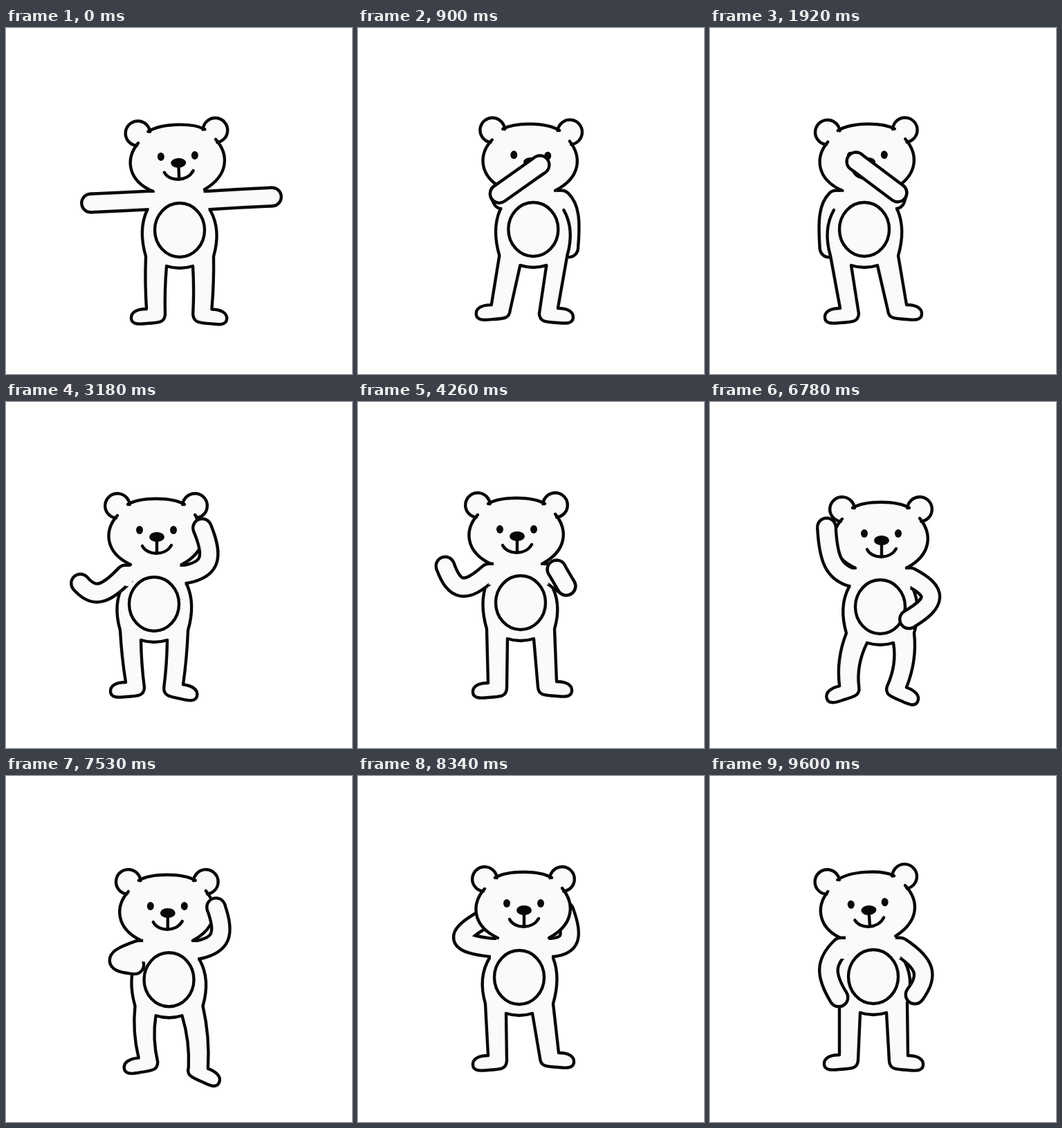
Recreate the animation shown at these times as an HTML page with a canvas. Size 500 by 500 pixels, loop 9630 ms.

```html
<!DOCTYPE html>
<html lang="en">
<head>
<meta charset="utf-8">
<title>Dancing bear</title>
<style>
  html, body { margin: 0; width: 100%; height: 100%; overflow: hidden; background: #fff; }
  canvas { display: block; width: 100vw; height: 100vh; object-fit: contain; }
</style>
</head>
<body>
<canvas id="stage" width="500" height="500"></canvas>
<script>
const ctx = document.getElementById('stage').getContext('2d');
const LOOP = 9630, STEP = 30, AXIS = 477;
const FUR = '#fafafa', INK = '#080808', LINE = 4.4, ARM = 26.5;

// Elbow x, y and hand x, y measured outward from the shoulder, then folded and behind flags.
const ARMS = {
  sideL: [40, 2, 84, 4, 0, 0],
  sideR: [46, -3, 92, -5, 0, 0],
  back: [14, 14, 10, 70, 0, 1],
  cover: [3, -10, -57, -55, 1, 0],
  wave: [40, 42, 65, 13, 0, 0],
  up: [49, -9, 25, -67, 0, 0],
  curl: [26, 19, 12, -5, 1, 0],
  lift: [45, 40, 63, -10, 0, 0],
  raise: [32, -10, 35, -72, 0, 0],
  hip: [53, 28, -2, 61, 0, 0],
  napeL: [70, -8, 10, -42, 0, 1],
  napeR: [38, -3, 19, -53, 0, 1],
  hangL: [30, 29, 3, 73, 0, 0],
  hangR: [49, 32, 21, 69, 0, 0]
};

// head: x, y, tilt; belly: x, y; feet: left toe x, y, right toe x, y
const pose = (head, belly, left, right, feet) =>
  ({ head, belly, left: ARMS[left], right: ARMS[right], feet });

const mirror = ({ head, belly, left, right, feet }) => ({
  head: [AXIS - head[0], head[1], -head[2]],
  belly: [AXIS - belly[0], belly[1]],
  left: right,
  right: left,
  feet: [AXIS - feet[2], feet[3], AXIS - feet[0], feet[1]]
});

const open = pose([248, 189, -.04], [251, 292], 'sideL', 'sideR', [181, 420, 319, 421]);
const shy = pose([227, 188, -.03], [223, 291], 'back', 'cover', [166, 419, 306, 414]);
const hello = pose([217, 189, 0], [214, 292], 'wave', 'up', [151, 419, 276, 425]);
const groove = pose([248, 188, 0], [242, 290], 'curl', 'lift', [168, 418, 311, 420]);
const salute = pose([247, 194, 0], [246, 296], 'raise', 'hip', [169, 429, 300, 433]);
const relax = pose([239, 188, 0], [233, 291], 'napeL', 'napeR', [166, 418, 312, 414]);
const rest = pose([228, 188, -.07], [236, 290], 'hangL', 'hangR', [165, 417, 308, 418]);
const kick = { ...mirror(salute), feet: [174, 428, 306, 457] };

const TIMELINE = [
  [0, open], [480, rest], [960, mirror(shy)], [1440, mirror(rest)], [1920, shy],
  [2520, mirror(hello)], [3180, hello], [3780, mirror(hello)], [4260, mirror(groove)],
  [4680, groove], [5040, mirror(groove)], [5400, groove], [5820, mirror(groove)],
  [6240, mirror(salute)], [6780, salute], [7350, kick], [7800, mirror(relax)],
  [8340, relax], [8820, mirror(relax)], [9210, mirror(rest)], [9600, rest]
];

function poseAt(time) {
  let i = TIMELINE.findIndex(key => key[0] > time) - 1;
  if (i < 0) i = TIMELINE.length - 2;
  const [start, from] = TIMELINE[i], [end, to] = TIMELINE[i + 1];
  const k = (1 - Math.cos(Math.PI * Math.min(1, (time - start) / (end - start)))) / 2;
  const result = {};
  for (const part in from) {
    result[part] = from[part].map((value, n) => value + (to[part][n] - value) * k);
  }
  return result;
}

function ink(path) {
  ctx.strokeStyle = INK;
  ctx.lineWidth = LINE;
  ctx.lineCap = ctx.lineJoin = 'round';
  ctx.stroke(path);
}

function fill(path, color = FUR) {
  ctx.fillStyle = color;
  ctx.fill(path);
}

function oval(x, y, rx, ry = rx, from = 0, to = Math.PI * 2) {
  const path = new Path2D();
  path.ellipse(x, y, rx, ry, 0, from, to);
  return path;
}

// A tube has an inked rim and a rounded end; its start is open or rounded.
function tube(path, end, startCap) {
  ctx.lineCap = startCap;
  ctx.lineJoin = 'round';
  for (const [color, grow] of [[INK, LINE], [FUR, -LINE]]) {
    ctx.strokeStyle = color;
    ctx.lineWidth = ARM + grow;
    ctx.stroke(path);
    fill(oval(...end, (ARM + grow) / 2), color);
  }
}

function armShape(shoulder, side, [ex, ey, hx, hy, folded, behind]) {
  const { x, y } = shoulder;
  return {
    x, y, side,
    elbow: [x + side * ex, y + ey],
    hand: [x + side * hx, y + hy],
    folded: folded > .5,
    behind: behind > .5
  };
}

function drawUpperArm({ x, y, side, elbow, hand, folded }) {
  const path = new Path2D();
  const toElbow = ([px, py]) => [px + (elbow[0] - px) * .75, py + (elbow[1] - py) * .75];
  path.moveTo(x - side * 7, y);
  path.lineTo(x, y);
  if (folded) path.lineTo(...elbow);
  else path.bezierCurveTo(...toElbow([x, y]), ...toElbow(hand), ...hand);
  tube(path, folded ? elbow : hand, 'butt');
}

function drawForearm({ elbow, hand, folded }) {
  if (!folded) return;
  const path = new Path2D();
  path.moveTo(...elbow);
  path.lineTo(...hand);
  tube(path, hand, 'round');
}

function halfBody(bx, by, shoulder, side, toeX, toeY) {
  const path = new Path2D();
  const hipX = bx + side * 49, hipY = by + 38;
  // A lowered toe turns the foot downward.
  const tilt = Math.max(0, Math.min(.35, (toeY - 420) * .026));
  const cos = Math.cos(tilt), sin = Math.sin(tilt);
  const foot = (x, y) => [toeX - side * (x * cos + y * sin), toeY + y * cos - x * sin];
  const [ankleX, ankleY] = foot(22, -14), [heelX, heelY] = foot(49, -6);
  const bow = side * Math.max(0, by - 291) * 2;
  path.moveTo(shoulder.x + side * 3, shoulder.y + 15);
  path.quadraticCurveTo(bx + side * 60, by, hipX, hipY);
  path.quadraticCurveTo((hipX + ankleX) / 2 + bow, (hipY + ankleY) / 2, ankleX, ankleY);
  path.bezierCurveTo(...foot(8, -14), ...foot(-1, -9), ...foot(0, 0));
  path.bezierCurveTo(...foot(1, 9), ...foot(12, 8), ...foot(22, 7));
  path.bezierCurveTo(...foot(42, 6), ...foot(48, 5), heelX, heelY);
  const innerX = bx + side * 19, innerY = by + 52;
  path.quadraticCurveTo((heelX + innerX) / 2 + bow, (heelY + innerY) / 2, innerX, innerY);
  path.quadraticCurveTo(bx + side * 10, by + 55, bx, by + 55);
  const area = new Path2D(path);
  area.lineTo(bx - side * 2, by + 55);
  area.lineTo(bx - side * 2, shoulder.y + 15);
  return { path, area };
}

function drawHead([x, y, tilt]) {
  ctx.save();
  ctx.translate(x, y);
  ctx.rotate(tilt);
  for (const side of [-1, 1]) fill(oval(side * 56, -39, 17.8));
  fill(new Path2D('M-41-41C-22-52 22-52 41-41L56-26C74-4 74 24 37 46V52H-37V46C-74 24-74-4-56-26Z'));
  ink(oval(-56, -39, 17.8, 17.8, Math.PI * .54, Math.PI * 1.97));
  ink(oval(56, -39, 17.8, 17.8, Math.PI * 1.03, Math.PI * 2.46));
  ink(new Path2D('M-41-41C-22-52 22-52 41-41M-56-25C-75-4-75 28-37 46M56-26C74-4 74 26 37 46'));
  fill(oval(-24, -4, 5, 6), INK);
  fill(oval(25, -4, 5, 6), INK);
  fill(oval(1, 6, 11, 7), INK);
  ink(new Path2D('M1 8V28M-20 19C-13 33 13 34 22 18'));
  ctx.restore();
}

function draw({ head, belly, left, right, feet }) {
  const [bx, by] = belly;
  const middle = (head[0] + bx) / 2;
  const shoulderY = by - 43;
  const shoulders = [-1, 1].map(side => ({ x: middle + side * 43, y: shoulderY }));
  const arms = [left, right].map((arm, i) => armShape(shoulders[i], i ? 1 : -1, arm));
  const halves = shoulders.map((shoulder, i) =>
    halfBody(bx, by, shoulder, i ? 1 : -1, feet[i * 2], feet[i * 2 + 1]));

  ctx.fillStyle = '#fff';
  ctx.fillRect(0, 0, 500, 500);
  arms.filter(arm => arm.behind).forEach(arm => {
    drawForearm(arm);
    drawUpperArm(arm);
  });
  halves.forEach(half => fill(half.area));
  halves.forEach(half => ink(half.path));
  ctx.fillStyle = FUR;
  ctx.fillRect(middle - 44, shoulderY - 11, 88, 26);
  ink(oval(bx, by, 36, 39));
  drawHead(head);

  const front = arms.filter(arm => !arm.behind);
  front.forEach(drawUpperArm);
  // Joins each shoulder to the chest.
  front.forEach(({ x, side }) => {
    ctx.fillStyle = FUR;
    ctx.fillRect(side < 0 ? x : x - 10, shoulderY - 11, 10, 28);
  });
  front.forEach(drawForearm);
}

const started = performance.now();
function tick() {
  const time = (performance.now() - started) % LOOP;
  draw(poseAt(Math.floor(time / STEP) * STEP));
  requestAnimationFrame(tick);
}
tick();
</script>
</body>
</html>
```
